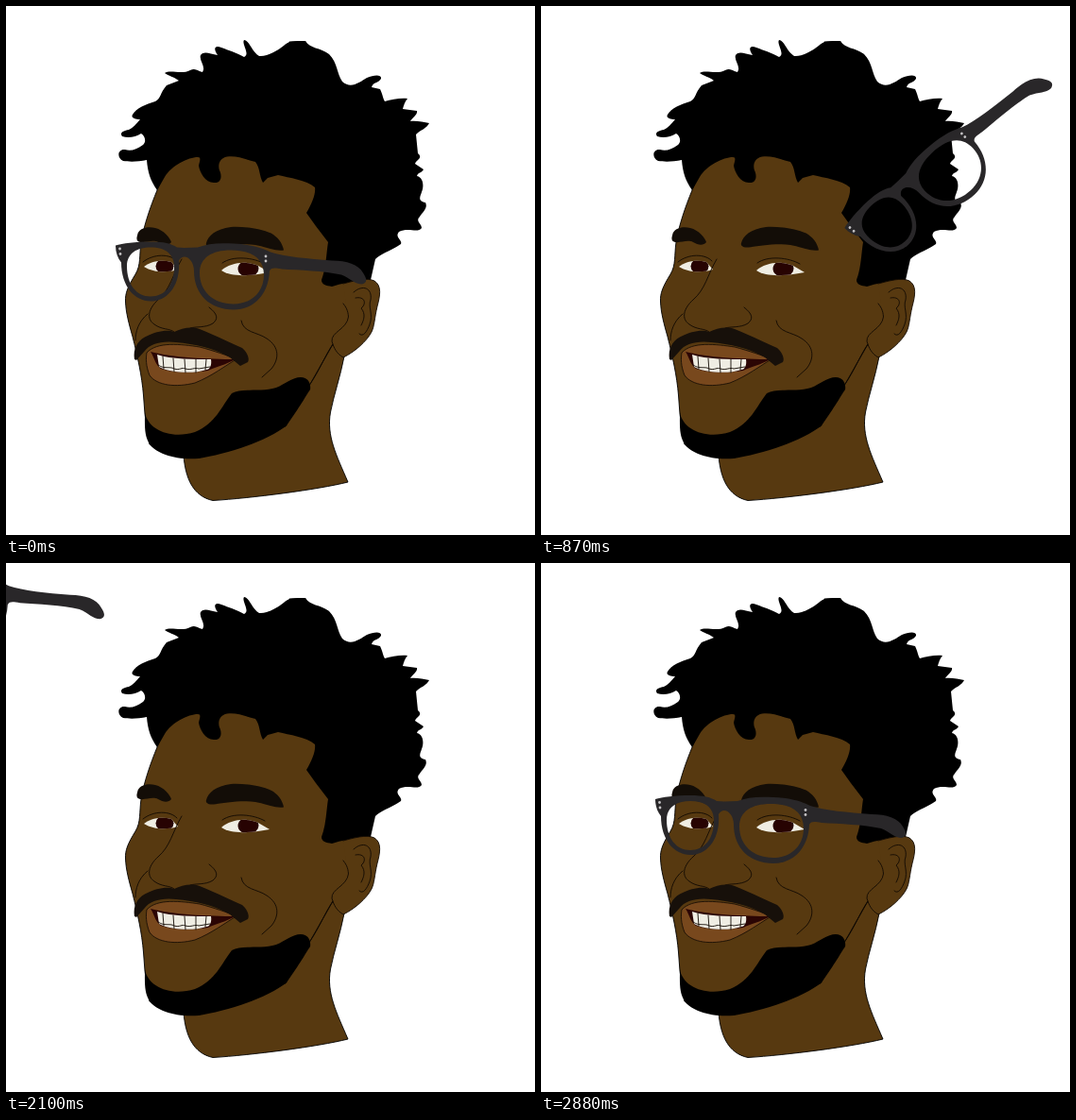
Animation, 560 px wide and 560 px high, one loop 3.61 s. Source, as an HTML page:

```html
<!DOCTYPE html>
<html lang="en">
<head>
<meta charset="utf-8">
<title>Flying glasses</title>
<style>
  html, body { margin: 0; width: 100%; height: 100%; overflow: hidden; background: #fff; }
  svg { display: block; width: 100vw; height: 100vh; }
  .skin { fill: #573910; stroke: #000; stroke-width: .9; }
  .bare { stroke: none; }
  .line { fill: none; stroke: #110a03; stroke-width: .9; stroke-linecap: round; }
  .brow { fill: #130d07; }
  .white { fill: #efede3; }
  .iris { fill: #270302; }
  .frame { fill: #292729; fill-rule: evenodd; }
  .rivet { fill: #c4c2c4; }
</style>
</head>
<body>
<svg viewBox="0 0 560 560">
  <defs>
    <clipPath id="eyeL"><path d="M146 276C152 271 163 268 175 271L182 279C172 282 157 283 146 276Z"/></clipPath>
    <clipPath id="eyeR"><path d="M228 280C237 272 254 269 267 275L279 282C262 285 240 288 228 280Z"/></clipPath>
  </defs>

  <!-- neck and face -->
  <path class="skin" d="M188 476C190 500 198 519 219 523.500C260 521 330 512 362 504C350 476 339 455 343.500 430C347 412 354 392 358 371L345 355L300 400Z"/>
  <path class="skin" d="M160 195C153 212 146 232 143 250C141 264 143 274 137 284C129 297 126 304 126.500 313C127 325 130 336 134 350C139 370 144 392 145.500 412L147 432L152 464L205 478L296 445L321 402L346 358L370 345L370 294L330 140L180 145Z"/>

  <!-- hair -->
  <path d="M160 195C153 185 150 176 149 163C140 165 130 165 124 164C117 161 118 151 126 152C132 154 138 152 145 147C149 144 147 137 143 135C137 139 129 140 123 138C120 134 124 132 130 131C134 129 138 125 142 120C136 120 132 118 134 115C138 108 148 104 158 101C164 98 163 92 170 84L183 79C178 75 172 74 168 71C174 67 186 73 195 68C201 65 203 69 208 70C212 64 204 58 206 52C210 47 216 51 224 52C219 45 221 41 228 44C236 47 243 49 252 54C259 51 249 40 252 36C258 37 260 48 268 53C276 54 288 47 294 42C300 36 310 37 317 37L340 160L288 179L277 182L272 187C268 180 269 171 264 165C255 163 245 158 234 159.500C226 161 224 168 226 174C229 180 228 188 220 187C211 187 205 176 204 169C205 164 207 160 203 160C193 160 175 169 168 181Z"/>
  <path d="M300 37.500L317 37C321 45 333 44 342 51C351 60 350 71 356 80C365 88 374 81 382 76C389 73 398 72 397 77C394 82 389 80 387 86L396 88C399 94 399 98 401 101C408 99 418 97 425 98C422 102 421 105 420 109L435 111C436 115 430 118 428 122C434 121 442 123 448 124C445 130 439 131 434 136L436 156C442 161 434 163 433 167L442 173C440 177 436 176 435 180C443 182 442 193 440 197C438 203 436 206 444 208C447 214 441 218 438 223C433 228 440 230 440 235C436 241 426 234 416 239C411 245 420 248 418 252C410 258 397 262 391 268L386 290C370 291 353 294 345 297C339 296 334 295 334 290C339 277 339 262 341 250L328 233L318 219C324 209 328 199 327 192C318 184 300 182 288 179L230 140Z"/>

  <!-- ear -->
  <path class="skin bare" d="M357 294C368 291 382 287 390 291C398 296 396 307 393 318C390 331 390 339 387 345C382 355 368 367 357 372C350 368 347 362 345 355C346 345 360 342 362 330Z"/>
  <path class="line" d="M357 294C368 291 382 287 390 291C398 296 396 307 393 318C390 331 390 339 387 345C382 355 368 367 357 372C350 368 347 362 345 355C344 345 361 342 362.500 329C362 322 360 319 357 315M368 303C378 294 388 299 386 311C383 319 389 326 385 337C382 345 378 351 374 347M370 309C380 307 382 315 376 320C381 326 379 332 376 338M346 358C337 371 332 386 322 400"/>

  <!-- beard -->
  <path d="M147 430C150 449 175 459 200 451C222 442 228 424 239 410C250 404 270 409 286 404C296 400 303 393 312 393C320 393 323 400 322 406C316 415 312 423 297 444C275 462 230 475 204 479C180 481 160 474 152 464C146 454 147 444 147 430Z"/>

  <!-- brows, eyes -->
  <path class="brow" d="M139 243C140 235 150 233 158 235C167 237 174 246 175 250C172 254 166 253 161 250C155 247 148 251 142 250C138 249 138 246 139 243Z"/>
  <path class="brow" d="M212 251C214 243 222 236 238 234C255 233 275 237 283 242C290 247 293 253 294 258.500C285 260 275 255 264 253C250 251 230 254 220 255.500C214 256 211 254 212 251Z"/>
  <path class="white" d="M146 276C152 271 163 268 175 271L182 279C172 282 157 283 146 276Z"/>
  <path class="white" d="M228 280C237 272 254 269 267 275L279 282C262 285 240 288 228 280Z"/>
  <ellipse class="iris" cx="168" cy="275.500" rx="9.500" ry="8" clip-path="url(#eyeL)"/>
  <ellipse class="iris" cx="256.500" cy="278" rx="11" ry="9" clip-path="url(#eyeR)"/>
  <path class="line" d="M145 271C156 262 174 262 181 270M229 272C240 264 262 266 274 273"/>

  <!-- nose, cheek -->
  <path class="line" d="M186 268C176 285 174 300 161 311C151 320 148 331 157 337C165 343 173 341 178 345M150 326C140 334 137 345 137 354M215 319C224 326 225 331 219 336C211 341 201 339 195 341M249 333C251 346 266 345 276 352C290 361 289 374 281 384L271 393"/>

  <!-- mouth -->
  <path d="M149 367C160 355 185 358 205 361C220 365 235 370 244 374C233 380 218 392 200 399C180 404 160 402 152 391C148 381 148 373 149 367Z" fill="#78481d" stroke="#110a03" stroke-width=".8"/>
  <path d="M153 366C175 372 215 374 243 374C232 380 222 382 214 386C195 389 175 388 164 384C158 380 157 372 153 366Z" fill="#2b0504"/>
  <path class="white" d="M160 369C175 374 200 374 217 374C218 380 216 385 212 385C198 390 172 388 162 382Z"/>
  <path class="line" d="M166 371L167 384M177 373L178 387M189 374L190 388M201 374L201 388M212 374L211 385M161 380C168 385 173 381 178 384C184 386 186 382 190 384C196 386 200 382 204 384L216 382"/>
  <path d="M136 374C134 362 140 353 150 349C158 345 170 342 178 345C186 341 196 339 205 342C225 350 240 358 250 362C256 367 258 374 256 377L248 381L237 372C220 362 200 358 180 356C165 354 152 358 147 365L138 375Z" fill="#17100a"/>

  <g id="glasses">
    <path class="frame" d="M121 250C128 248 142 246 158 246C172 246 180 248 186 252C194 253 201 252 208 252C218 248 230 247 246 248C266 249 277 253 285 257C300 262 325 264 350 266C366 266 378 270 383 279C387 285 388 289 382 291C374 291 370 285 360 281C342 277 315 276 297 275C290 274 286 273 284 277C283 302 267 318 246 318C221 318 204 302 204 277C204 264 193 257 188 266C190 292 176 309 158 309C141 309 127 293 127 268C123 263 121 257 121 250Z
      M133 272C133 258 144 252 158 252C174 252 183 259 183 273C183 292 173 304 158 304C143 304 133 291 133 272Z
      M210 279C210 263 223 255 243 255C266 255 278 264 278 281C278 300 264 312 246 312C224 312 210 298 210 279Z"/>
    <g class="rivet">
      <circle cx="125.500" cy="253.500" r="1.400"/><circle cx="126" cy="259" r="1.400"/>
      <circle cx="280" cy="261.500" r="1.400"/><circle cx="280" cy="266.500" r="1.400"/>
    </g>
  </g>
</svg>
<script>
  const LOOP = 3610, STEP = 30, END = 2880;
  const PIVOT = [253.5, 282];
  const glasses = document.getElementById('glasses');

  // Flight paths of the pivot: time, x, y
  const leave = [[0, 248.5, 285.5], [360, 384, 181], [600, 412, 172],
                 [870, 440, 168], [1080, 605, 148], [1200, 750, 144]];
  const enter = [[1830, -118, -8], [2250, 23, 83], [2310, 54, 109],
                 [2340, 67, 121], [2640, 202.5, 237], [2880, 253.5, 282]];

  const clamp = u => Math.min(1, Math.max(0, u));
  const inOut = u => u < .5 ? 2 * u * u : 1 - 2 * (1 - u) ** 2;
  const turn = (t, from, to) => 360 * inOut(clamp((t - from) / (to - from)));

  function slope(keys, i, axis) {
    const a = keys[Math.max(0, i - 1)], b = keys[Math.min(keys.length - 1, i + 1)];
    return (b[axis] - a[axis]) / (b[0] - a[0]);
  }

  // Cubic Hermite curve through the keys
  function along(keys, t, axis) {
    let i = 0;
    while (i < keys.length - 2 && t >= keys[i + 1][0]) i++;
    const a = keys[i], b = keys[i + 1], d = b[0] - a[0], u = clamp((t - a[0]) / d);
    const w = u * u * (3 - 2 * u);
    return a[axis] * (1 - w) + b[axis] * w
      + d * u * (1 - u) * (slope(keys, i, axis) * (1 - u) - slope(keys, i + 1, axis) * u);
  }

  function draw(now) {
    const t = Math.min(END, Math.floor(now % LOOP / STEP) * STEP);
    const leaving = t < 1170, keys = leaving ? leave : enter;
    const angle = leaving ? turn(t, 153, 1102) : turn(t, 2090, 2430);
    const [px, py] = PIVOT;
    glasses.style.visibility = leaving || t >= 1830 ? 'visible' : 'hidden';
    glasses.setAttribute('transform',
      `translate(${along(keys, t, 1)} ${along(keys, t, 2)}) rotate(${angle}) translate(${-px} ${-py})`);
  }

  const start = performance.now();
  function tick() {
    draw(performance.now() - start);
    requestAnimationFrame(tick);
  }
  tick();
</script>
</body>
</html>
```
